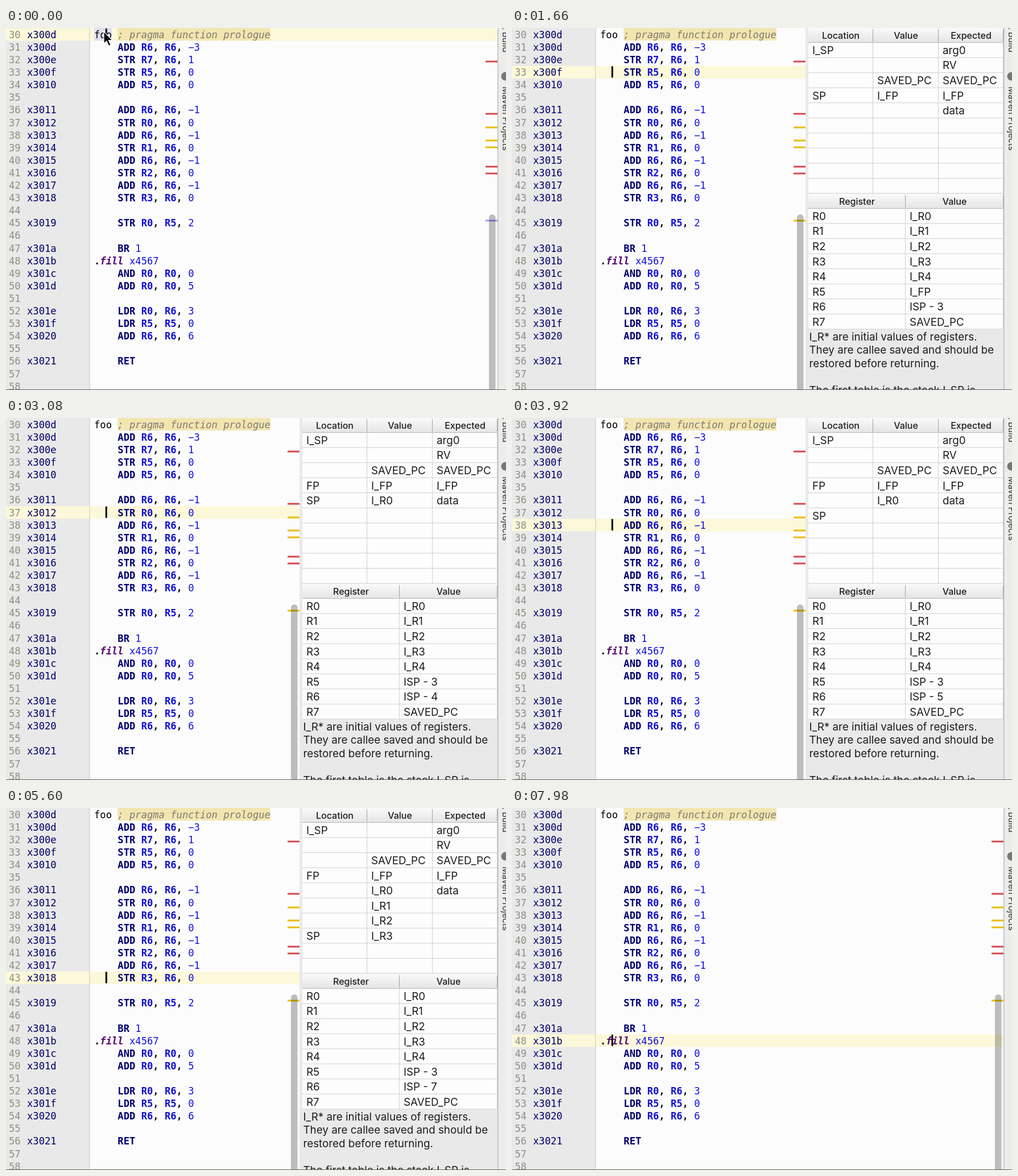
Recreate the animation shown at these times as an HTML page. Size 879 by 637 pixels, loop 8 s.

```html
<!DOCTYPE html>
<html lang="en">
<head>
<meta charset="utf-8">
<title>Stack trace of an assembly routine</title>
<style>
  html, body { margin: 0; width: 100%; height: 100%; overflow: hidden; background: #fcfcfc; }
  svg { display: block; width: 879px; height: 637px; }
  .code text { font: 17.16px "DejaVu Sans Mono", monospace; white-space: pre; }
  .code .num { fill: #8e8e88; }
  .code .addr { fill: #00006a; }
  .code .op { fill: #000070; font-weight: bold; }
  .code .reg { fill: #1010d8; font-weight: bold; }
  .code .lit { fill: #1010e0; }
  .code .dir { fill: #56086e; font-weight: bold; font-style: italic; }
  .code .note { fill: #7d7a70; font-style: italic; }
  .code .punct { fill: #101010; font-weight: bold; }
  .panel text { font: 18.8px Inter, sans-serif; fill: #1c1c1c; }
  .panel .head { font-size: 16px; font-weight: 500; text-anchor: middle; }
  .side text { font: 15.5px Inter, sans-serif; fill: #333; }
</style>
</head>
<body>
<svg id="stage" viewBox="0 0 879 637">
  <defs>
    <linearGradient id="shade" x2="0" y2="1">
      <stop offset="0" stop-color="#fafafa"/>
      <stop offset="1" stop-color="#e4e4e4"/>
    </linearGradient>
  </defs>
</svg>
<script>
const LOOP = 8000, ROW = 22.1, CHAR = 10.33, LEFT = 155, CELL = 26.55;
const FIRST = 30;

// Time at which the caret reaches lines 31, 32, ...
const MOVES = [640, 1160, 1600, 2040, 2440, 2740, 3040, 3660, 4100, 4480,
               4840, 5160, 5480, 5960, 6700, 6980, 7540, 7900];

const SOURCE = `foo ; pragma function prologue
    ADD R6, R6, -3
    STR R7, R6, 1
    STR R5, R6, 0
    ADD R5, R6, 0

    ADD R6, R6, -1
    STR R0, R6, 0
    ADD R6, R6, -1
    STR R1, R6, 0
    ADD R6, R6, -1
    STR R2, R6, 0
    ADD R6, R6, -1
    STR R3, R6, 0

    STR R0, R5, 2

    BR 1
.fill x4567
    AND R0, R0, 0
    ADD R0, R0, 5

    LDR R0, R6, 3
    LDR R5, R5, 0
    ADD R6, R6, 6

    RET

`.split("\n");

const stage = document.getElementById("stage");

function add(parent, tag, attrs, content) {
  const node = document.createElementNS("http://www.w3.org/2000/svg", tag);
  for (const key in attrs) node.setAttribute(key, attrs[key]);
  if (content !== undefined) node.textContent = content;
  return parent.appendChild(node);
}
const group = (cls, parent = stage) => add(parent, "g", { class: cls });
const rect = (parent, x, y, width, height, fill, more) =>
  add(parent, "rect", { x, y, width, height, fill, ...more });
const label = (parent, x, y, content, cls = "") =>
  add(parent, "text", { x, y, class: cls }, content);
const show = (node, on) => node.setAttribute("visibility", on ? "visible" : "hidden");
const rowTop = line => 1 + (line - FIRST) * ROW;

// Editor
rect(stage, 0, 0, 879, 637, "#fcfcfc");
rect(stage, 0, 0, 147, 637, "#e9e9e9");
const band = rect(stage, 0, 0, 864, 22, "#fcf8d9");
rect(stage, 146.5, 0, 1, 637, "#c6c6c6");
rect(stage, LEFT + 4 * CHAR, 0, 26 * CHAR, 22, "#f3e5b0");
const match = rect(stage, LEFT, 0, 3 * CHAR, 22, "#dedef2");

const code = group("code");
const TOKENS = [
  ["note", /^;.*/], ["punct", /^[.,]/], ["dir", /^fill/], ["plain", /^foo/],
  ["reg", /^R\d/], ["op", /^[A-Z]+/], ["lit", /^[-x\d]+/]
];

function drawLine(source, y) {
  for (let col = 0; col < source.length;) {
    const rest = source.slice(col);
    const hit = TOKENS.find(([, pattern]) => pattern.test(rest));
    if (!hit) { col++; continue; }
    const word = rest.match(hit[1])[0];
    label(code, LEFT + col * CHAR, y, word.replace("-", "\u2212"), hit[0]);
    col += word.length;
  }
}

let address = 0x300d;
SOURCE.forEach((source, i) => {
  const y = rowTop(FIRST + i) + 16.8;
  label(code, 5, y, FIRST + i, "num");
  if (source) {
    label(code, 37, y, "x" + address.toString(16), "addr");
    if (i) address++;
  }
  drawLine(source, y);
});

const caret = rect(stage, 0, 0, 3, 20, "#000");

// Error stripe and scrollbar
const stripe = group("stripe");
const RED = "#d64a4a", YELLOW = "#e8bd0c";
for (const [y, color] of [[59, RED], [151, RED], [175, YELLOW], [198, YELLOW],
                          [210, YELLOW], [244, RED], [256, RED]])
  rect(stripe, 843, y - 1.5, 21, 3, color);
const lastMark = rect(stripe, 843, 337.5, 21, 3, YELLOW);
rect(stripe, 849, 328, 11.5, 330, "#000", { rx: 5.7, opacity: .25 });

// Stack and register tables
const panel = group("panel");
rect(panel, 516, 0, 348, 637, "#e9e9e9");

function table(top, edges, titles, rows) {
  const right = edges[edges.length - 1], left = edges[0];
  const bottom = top + CELL * rows;
  rect(panel, left, top, right - left, bottom - top, "#fdfdfd");
  for (let r = 1; r <= rows; r++)
    rect(panel, left, top + r * CELL - 1, right - left, 1, "#cfcfcf");
  for (const x of edges.slice(1)) rect(panel, x - 1, top, 1, bottom - top, "#cfcfcf");
  rect(panel, left, top - 26, right - left, 26, "url(#shade)");
  rect(panel, left, top - 1, right - left, 1, "#b4b4b4");
  titles.forEach((title, c) => {
    label(panel, (edges[c] + edges[c + 1]) / 2, top - 7, title, "head");
    rect(panel, edges[c + 1] - 1, top - 24, 1, 22, "#a0a0a0");
  });
  return Array.from({ length: rows }, (_, r) =>
    titles.map((_, c) => label(panel, edges[c] + 7, top + (r + .5) * CELL + 6.6, "")));
}
const stack = table(26, [521, 635, 750, 864], ["Location", "Value", "Expected"], 10);
const registers = table(318, [521, 692, 864], ["Register", "Value"], 8);

["arg0", "RV", "SAVED_PC", "I_FP", "data"].forEach((name, r) => stack[r][2].textContent = name);
registers.forEach(([name, value], r) => {
  name.textContent = "R" + r;
  value.textContent = r === 7 ? "SAVED_PC" : "I_R" + r;
});
["I_R* are initial values of registers.", "They are callee saved and should be",
 "restored before returning.", "", "The first table is the stack I-SP is"]
  .forEach((words, i) => label(panel, 522.5, 550 + i * 23.4, words));

// Tool window strip
const side = group("side");
rect(side, 864, 0, 15, 637, "#ececec");
rect(side, 864, 0, 1.5, 637, "#bdbdbd");
add(side, "text", { transform: "translate(873 43) rotate(90)", "text-anchor": "end" }, "Ant Build");
add(side, "circle", { cx: 878, cy: 85, r: 7.5, fill: "#777" });
add(side, "text", { transform: "translate(873 103) rotate(90)" }, "Maven Projects");
rect(stage, 0, 636, 879, 1, "#5c5c5c");

const pointer = add(stage, "path", {
  d: "M172 6V27.5L176.8 23L180.6 31.5L184.2 30L180.5 21.6H187Z",
  fill: "#000", stroke: "#fff", "stroke-width": 1.3
});

// Machine state after the caret's line has run
function updateTables(line) {
  const pushes = Math.max(0, Math.min(4, Math.floor((line - 34) / 2)));
  const top = 3 + pushes;
  const places = { 0: "I_SP", [top]: "SP" };
  if (line >= 34) places[3] = "FP";
  const values = {};
  if (line >= 45) values[1] = "I_R0";
  if (line >= 32) values[2] = "SAVED_PC";
  if (line >= 33) values[3] = "I_FP";
  for (let r = 0; r < 4; r++) if (line >= 37 + 2 * r) values[4 + r] = "I_R" + r;
  stack.forEach((cells, r) => {
    cells[0].textContent = places[r] || "";
    cells[1].textContent = values[r] || "";
  });
  registers[5][1].textContent = line >= 34 ? "ISP - 3" : "I_FP";
  registers[6][1].textContent = "ISP - " + top;
}

function render(line) {
  const start = line === FIRST;
  const open = !start && line < 48;
  band.setAttribute("y", rowTop(line) - .5);
  caret.setAttribute("y", rowTop(line));
  caret.setAttribute("x", SOURCE[line - FIRST] ? 174.8 : 154.8);
  stripe.setAttribute("transform", `translate(${open ? -348 : 0} 0)`);
  lastMark.setAttribute("fill", start ? "#ab93f0" : YELLOW);
  show(match, start);
  show(pointer, start);
  show(panel, open);
  updateTables(line);
}

let shown = 0;
const begin = performance.now();
function tick() {
  const time = (performance.now() - begin) % LOOP;
  const line = FIRST + MOVES.filter(at => at <= time).length;
  if (line !== shown) render(shown = line);
  requestAnimationFrame(tick);
}
tick();
</script>
</body>
</html>
```
